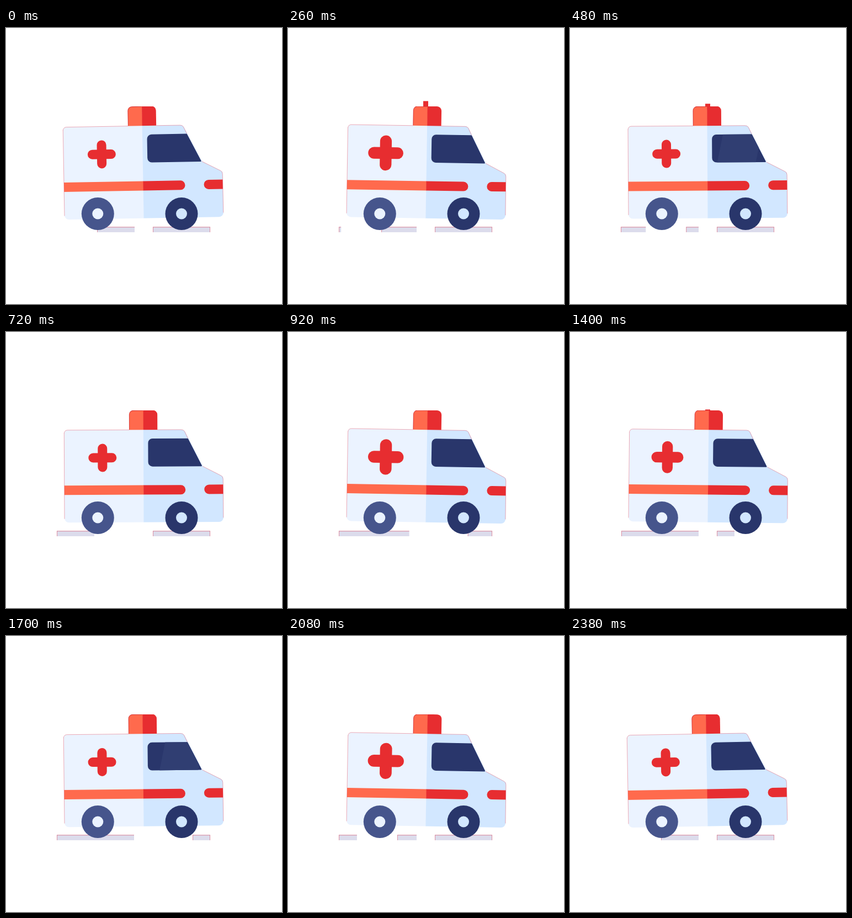
These frames come from a looping animation (500 px wide and 500 px high, 2400 ms). An HTML page with a canvas:

```html
<!DOCTYPE html>
<html lang="en">
<head>
<meta charset="utf-8">
<title>Ambulance</title>
<style>
  html, body { margin: 0; width: 100%; height: 100%; overflow: hidden; background: #fff; }
  canvas { display: block; width: 500px; height: 500px; }
</style>
</head>
<body>
<canvas id="stage" width="500" height="500"></canvas>
<script>
const ctx = document.getElementById('stage').getContext('2d');

const LOOP = 2400, STEP = 20, CYCLE = 2380;
const ROCK = CYCLE / 4, FLASH = CYCLE / 2;
const PIVOT = { x: 249.5, y: 340 };
const RED = '#e72d30', ORANGE = '#ff6a4d', NAVY = '#29366b', SLATE = '#46558c';
const PALE = '#ebf3ff', SKY = '#d2e7ff', ROAD = '#dcdcec', EDGE = 'rgba(222,70,90,.55)';

const clamp = v => Math.max(0, Math.min(1, v));

function rect(color, x, y, w, h, radii = 0) {
  ctx.fillStyle = color;
  ctx.beginPath();
  ctx.roundRect(x, y, w, h, radii);
  ctx.fill();
}

function disc(color, x, y, r) {
  ctx.fillStyle = color;
  ctx.beginPath();
  ctx.arc(x, y, r, 0, Math.PI * 2);
  ctx.fill();
}

// Closed outline from [x, y, corner radius] points.
function roundedPath(points) {
  const path = new Path2D();
  const last = points[points.length - 1];
  path.moveTo((last[0] + points[0][0]) / 2, (last[1] + points[0][1]) / 2);
  points.forEach(([x, y, r], i) => {
    const [nx, ny] = points[(i + 1) % points.length];
    path.arcTo(x, y, nx, ny, r);
  });
  path.closePath();
  return path;
}

const bodyShape = roundedPath([
  [106, 177.2, 6], [323, 177.2, 8], [356.5, 243.5, 1],
  [393.5, 262.5, 4], [394, 344.7, 8], [106, 344.7, 8]
]);
const windowShape = roundedPath([
  [258, 193, 8], [330.3, 193, 1], [356, 243.7, 1], [258, 243.7, 8]
]);

function clipped(shape, draw) {
  ctx.save();
  ctx.clip(shape);
  draw();
  ctx.restore();
}

// The road is one strip of 245 px, split by a 33 px break after 141 px.
function roadPiece(from, to) {
  [[0, 141, 92], [141, 245, 125]].forEach(([start, end, shift]) => {
    const a = Math.max(from, start) + shift, b = Math.min(to, end) + shift;
    if (b - a < 0.5) return;
    rect(ROAD, a, 360, b - a, 10);
    rect(EDGE, a, 360.3, b - a, 1);
    rect(EDGE, a, 361, 0.9, 9);
    if (b > 369.5) rect(EDGE, b - 0.9, 361, 0.9, 9);
  });
}

function drawRoad(t) {
  const length = 245, gap = 73;
  const travelled = 9 * length * t / CYCLE;
  const start = ((-travelled % length) + length) % length;
  const end = start + gap;
  if (end > length) {
    roadPiece(end - length, start);
  } else {
    roadPiece(0, start);
    roadPiece(end, length);
  }
}

function drawRay(t) {
  const p = t % FLASH;
  const height = 16 * Math.min(clamp((p - 200) / 100), clamp((510 - p) / 100));
  if (height > 0) rect(RED, 245, 142 - height, 9, height + 6);
}

function drawSiren() {
  rect(ORANGE, 224, 141.8, 26, 37, [8, 0, 0, 0]);
  rect(RED, 249.5, 141.8, 25.5, 37, [0, 8, 0, 0]);
  ctx.strokeStyle = 'rgba(205,35,45,.75)';
  ctx.lineWidth = 1;
  ctx.beginPath();
  ctx.moveTo(224.2, 177);
  ctx.lineTo(224.2, 149);
  ctx.arcTo(224.2, 142.3, 232, 142.3, 7);
  ctx.lineTo(249, 142.3);
  ctx.stroke();
}

function drawCross(t) {
  const p = clamp((t % ROCK - 125) / 345);
  const scale = 1 + 0.14 * (1 - Math.cos(2 * Math.PI * p));
  ctx.save();
  ctx.translate(175.3, 227.6);
  ctx.scale(scale, scale);
  rect(RED, -25.5, -8.5, 51, 17, 8.5);
  rect(RED, -8.5, -25.5, 17, 51, 8.5);
  ctx.restore();
}

function drawWindow(t) {
  ctx.fillStyle = NAVY;
  ctx.fill(windowShape);
  const x = 284 + 0.4 * (t % FLASH - 510);
  if (x < 205 || x > 362) return;
  clipped(windowShape, () => {
    ctx.fillStyle = '#303e72';
    ctx.beginPath();
    ctx.moveTo(x + 6, 192);
    ctx.lineTo(x + 76, 192);
    ctx.lineTo(x + 65, 245);
    ctx.lineTo(x - 5, 245);
    ctx.fill();
  });
}

function drawBody(t) {
  clipped(bodyShape, () => {
    rect(PALE, 100, 170, 150, 180);
    rect(SKY, 249.5, 170, 150, 180);
    rect(ORANGE, 100, 277.5, 150, 17);
    rect(RED, 249.5, 277.5, 76, 17, [0, 8.5, 8.5, 0]);
    rect(RED, 359.5, 277, 50, 17, 8.5);
  });
  ctx.strokeStyle = EDGE;
  ctx.lineWidth = 0.8;
  ctx.beginPath();
  ctx.moveTo(106, 338);
  ctx.lineTo(106, 183);
  ctx.arcTo(106, 177.2, 112, 177.2, 6);
  ctx.lineTo(224, 177.2);
  ctx.moveTo(275, 177.2);
  ctx.lineTo(318, 177.2);
  ctx.quadraticCurveTo(322, 177.2, 324, 180);
  ctx.lineTo(330.3, 193);
  ctx.moveTo(356.5, 243.5);
  ctx.lineTo(390, 260.8);
  ctx.quadraticCurveTo(393.5, 262.5, 393.6, 267);
  ctx.lineTo(393.9, 337);
  ctx.stroke();
  drawCross(t);
  drawWindow(t);
}

function drawAmbulance(t) {
  const angle = -Math.cos(2 * Math.PI * t / ROCK) * Math.PI / 180;
  const rocking = draw => {
    ctx.save();
    ctx.translate(PIVOT.x, PIVOT.y);
    ctx.rotate(angle);
    ctx.translate(-PIVOT.x, -PIVOT.y);
    draw();
    ctx.restore();
  };
  const belowTop = new Path2D();
  belowTop.rect(0, 142, 500, 358);
  clipped(belowTop, () => rocking(drawSiren));
  rocking(() => drawBody(t));
  disc(SLATE, 166.3, 336.5, 29.5);
  disc(PALE, 166.3, 336.5, 10);
  disc(NAVY, 318, 336.5, 29.5);
  disc(SKY, 318, 336.5, 10);
}

function frame(now) {
  const t = Math.floor((now % LOOP) / STEP) * STEP;
  ctx.fillStyle = '#fff';
  ctx.fillRect(0, 0, 500, 500);
  drawRoad(t);
  drawRay(t);
  drawAmbulance(t);
  requestAnimationFrame(frame);
}

frame(0);
</script>
</body>
</html>
```
